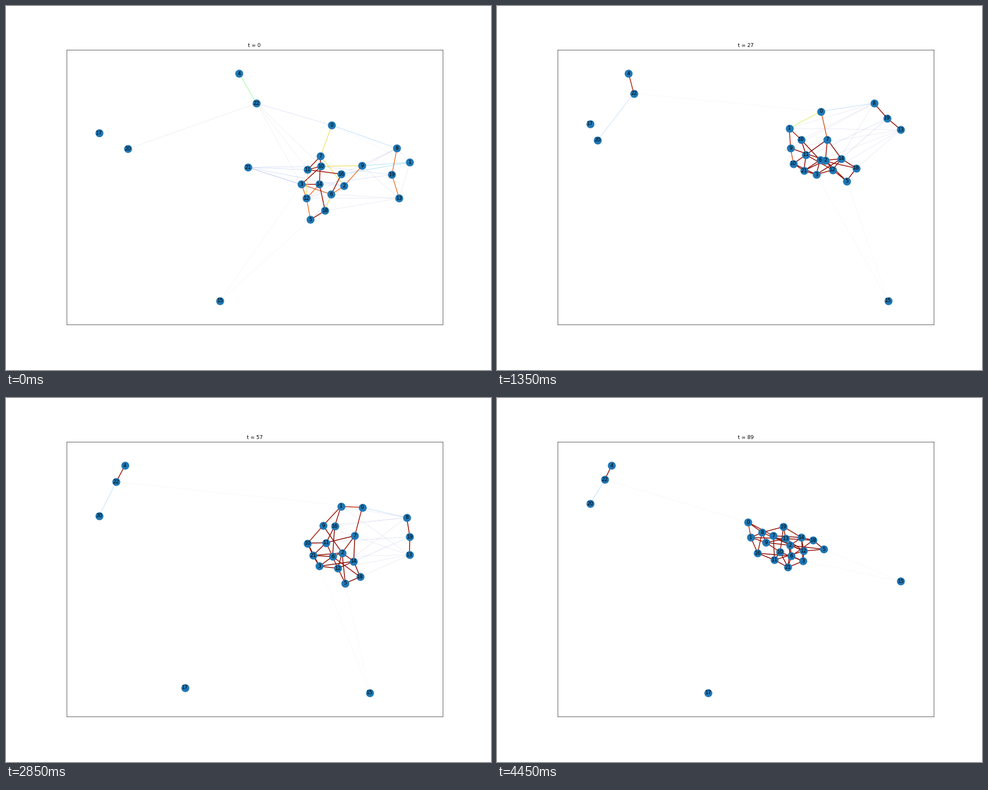
Recreate the animation shown at these times as a matplotlib script. Size 864 px wide and 648 px high, loop 4.5 s.

```python
import matplotlib.pyplot as plt
import numpy as np
from matplotlib.animation import FuncAnimation
from matplotlib.collections import LineCollection

FRAMES = 90
NODES = 23
MARGIN = 0.105
MAX_WIDTH = 2

time = np.arange(FRAMES)
paths = np.zeros((FRAMES, NODES, 2))
cluster = []
links = []

# The cluster morphs through four shapes, resting on the last two.
phase = np.interp(time, [0, 19, 35, 57, 74, 89], [0, 1, 2, 2, 3, 3])


def member(node, *shapes):
    """A node of the cluster, with its place in each of the four shapes."""
    x, y = np.transpose(shapes)
    steps = np.arange(len(shapes))
    paths[:, node] = np.column_stack([np.interp(phase, steps, x), np.interp(phase, steps, y)])
    cluster.append(node)


def loner(node, *stops):
    """A node outside the cluster that moves between (time, x, y) stops."""
    t, x, y = np.transpose(stops)
    paths[:, node] = np.column_stack([np.interp(time, t, x), np.interp(time, t, y)])


def sway_cluster():
    """Turn, scale and shift the whole cluster around its centre."""
    def track(*values):
        return np.interp(time, [0, 19, 35, 47, 57, 74, 89], values)

    angle = np.radians(track(0, 0, -14, 0, 0, 26, 0))
    size = track(1, 1, 1.05, 1, 0.95, 1, 1)
    shift = track(0, 0, -12, 0, 10, 23, 0) + 1j * track(0, 0, -42, 0, 16, 14, 0)
    points = paths[:, cluster, 0] + 1j * paths[:, cluster, 1]
    centre = points.mean(axis=1, keepdims=True)
    points = centre + shift[:, None] + (points - centre) * (size * np.exp(1j * angle))[:, None]
    paths[:, cluster] = np.stack([points.real, points.imag], axis=-1)


def link(pairs, start, end, begin=0, until=20):
    """Links whose weight eases out from start to end."""
    u = np.clip((time - begin) / (until - begin), 0, 1)
    weight = start + (end - start) * (1 - (1 - u) ** 2)
    for pair in pairs.split():
        a, b = sorted(map(int, pair.split("-")))
        links.append((a, b, weight))


member(0, (580, 212), (532, 244), (629, 175), (447, 221))
member(1, (719, 278), (458, 291), (589, 173), (452, 248))
member(2, (602, 320), (564, 329), (591, 260), (522, 262))
member(3, (526, 317), (570, 349), (548, 285), (545, 290))
member(5, (542, 380), (620, 352), (597, 317), (582, 269))
member(6, (579, 335), (564, 319), (573, 267), (524, 281))
member(7, (560, 267), (555, 290), (615, 228), (492, 245))
member(8, (696, 253), (629, 219), (713, 194), (472, 239))
member(9, (634, 284), (488, 324), (555, 209), (479, 257))
member(10, (561, 285), (520, 345), (526, 242), (504, 274))
member(11, (537, 291), (531, 321), (561, 241), (494, 288))
member(12, (535, 342), (592, 336), (583, 289), (546, 272))
member(13, (700, 342), (703, 251), (718, 264), (514, 250))
member(14, (558, 317), (596, 314), (613, 276), (542, 248))
member(16, (597, 299), (505, 298), (577, 210), (464, 276))
member(18, (568, 364), (630, 324), (625, 305), (563, 253))
member(19, (687, 300), (661, 240), (719, 230), (510, 229))
member(21, (431, 287), (542, 351), (536, 265), (518, 301))
sway_cluster()

loner(4, (0, 415, 120), (19, 271, 120), (35, 194, 122), (57, 212, 120), (89, 204, 120))
loner(15, (0, 381, 524), (19, 719, 524), (35, 646, 524), (57, 651, 524), (74, 719, 404), (89, 719, 326))
loner(17, (0, 166, 226), (19, 166, 170), (35, 166, 250), (47, 306, 510), (74, 343, 524), (89, 376, 524))
loner(20, (0, 217, 254), (19, 166, 206), (35, 192, 272), (47, 166, 222), (74, 166, 188))
loner(22, (0, 446, 173), (19, 280, 152), (35, 203, 161), (47, 189, 151), (74, 209, 146), (89, 192, 145))

# Strong links
link("3-10 3-14 6-16 7-11 7-14 10-11 11-16 14-18 5-18", 0.96, 0.98)
link("2-6 2-9 3-6 3-12 5-12 8-19 12-14 13-19", 0.8, 0.97)
link("2-7 6-18 11-12", 0.6, 0.96)
link("0-7 9-10", 0.62, 0.95, 0, 60)
link("4-22", 0.42, 0.96, 0, 35)
link("2-5 2-12 2-14 2-21 3-21 6-21 10-21 11-21", 0.13, 0.97)
link("1-9 1-16", 0.25, 0.96, 0, 35)
link("0-1", 0.02, 0.9, 16, 45)

# Links that only strengthen near the end
link("0-8", 0.2, 0.97, 58, 76)
link("1-8 1-13 9-13 12-13 13-18", 0.06, 0.97, 58, 76)
link("6-13 8-9 8-12 8-16", 0.06, 0.96, 64, 82)
link("10-19 14-19", 0.1, 0.96, 65, 88)

# Faint links
link("20-22", 0.05, 0.2, 0, 60)
link("0-22", 0.1, 0.015)
link("3-22 10-22 11-22", 0.04, 0)
link("3-15 5-15", 0.02, 0.015)

# Every frame is scaled so that the nodes fill the unit square.
low, high = paths.min(axis=1, keepdims=True), paths.max(axis=1, keepdims=True)
paths = (paths - low) / (high - low)

links.sort(key=lambda item: item[:2])
ends = np.array([item[:2] for item in links])
weights = np.stack([item[2] for item in links], axis=1)

fig, ax = plt.subplots(figsize=(16, 12), dpi=54)
fig.subplots_adjust(left=0.125, right=0.9, bottom=0.125, top=0.88)
ax.set(xlim=(-MARGIN, 1 + MARGIN), ylim=(1 + MARGIN, -MARGIN), xticks=[], yticks=[])
title = ax.set_title("t = 0", fontsize=12)
lines = ax.add_collection(LineCollection([], zorder=1), autolim=False)
dots = ax.scatter(*paths[0].T, s=300, color="#1f77b4", linewidths=1.5, zorder=2)
labels = [
    ax.text(x, y, str(i), fontsize=12, ha="center", va="center", zorder=3)
    for i, (x, y) in enumerate(paths[0])
]


def update(t):
    title.set_text(f"t = {t}")
    dots.set_offsets(paths[t])
    for label, point in zip(labels, paths[t]):
        label.set_position(point)
    lines.set_segments(paths[t][ends])
    lines.set_linewidths(MAX_WIDTH * weights[t])
    lines.set_color(plt.cm.turbo(weights[t]))
    return [title, dots, lines, *labels]


anim = FuncAnimation(fig, update, frames=FRAMES, interval=50, repeat=True, repeat_delay=0)
plt.show()
```
